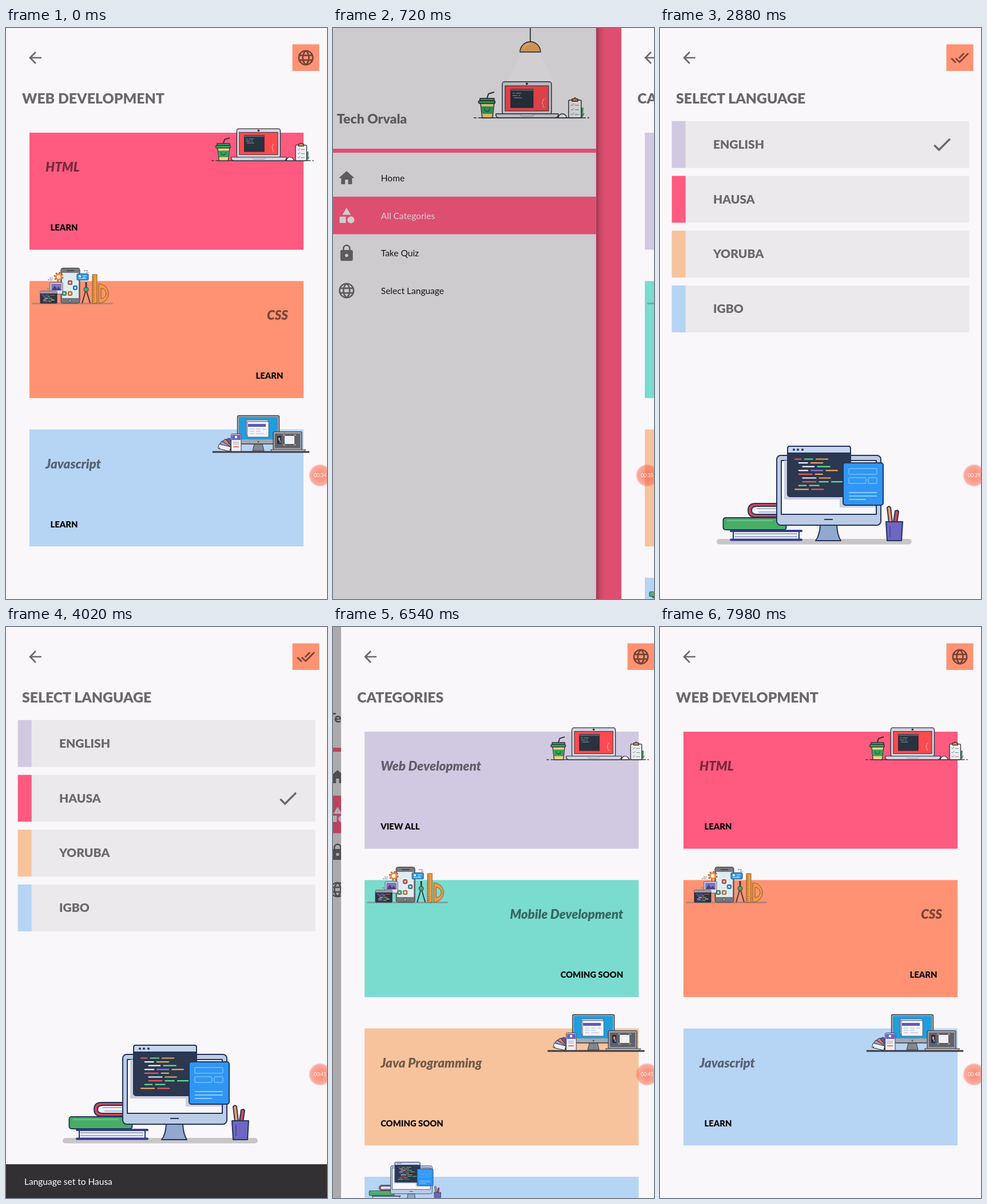
Animation, 561 px wide and 998 px high, one loop 8000 ms. Source, as an HTML page:

```html
<!DOCTYPE html>
<html lang="en">
<head>
<meta charset="utf-8">
<title>Learning app</title>
<style>
  html, body { margin: 0; width: 100%; height: 100%; overflow: hidden; background: #f9f7fa; }
  svg { display: block; width: 100%; height: 100%; }
  text { font-family: Lato, sans-serif; }
  .title { font-weight: 900; font-size: 24.8px; fill: #6b696c; }
  .card { font-weight: 900; font-style: italic; font-size: 22.3px; fill: rgba(0,0,0,.53); }
  .button { font-weight: 900; font-size: 14.8px; fill: #0d0b0d; }
  .language { font-weight: 900; font-size: 21px; fill: #6b696c; }
  .brand { font-weight: 900; font-size: 23px; fill: #6b696c; }
  .item { font-size: 15.5px; }
  .end { text-anchor: end; }
  .icon { fill: currentColor; }
  .ink { stroke: #2a2a32; stroke-width: 1.4; stroke-linejoin: round; stroke-linecap: round; }
  .navy { stroke: #24355c; stroke-width: 2; stroke-linejoin: round; stroke-linecap: round; }
</style>
</head>
<body>
<svg id="stage" viewBox="0 0 561 998"></svg>
<script>
const W = 561, H = 998, LOOP = 8000, STEP = 60, SLIDE = 300;
const PAGE = '#f9f7fa', PINK = '#ff5a80', ORANGE = '#fe9273', BLUE = '#b6d4f4',
      PURPLE = '#d1c9e1', TEAL = '#79dccf', PEACH = '#f7c39c', GREY = '#ebe9ec',
      TEXT = '#6b696c', FADED = 'rgba(0,0,0,.54)';

const rect = (x, y, w, h, fill, more = '') => `<rect x="${x}" y="${y}" width="${w}" height="${h}" fill="${fill}" ${more}/>`;
const circle = (x, y, r, fill, more = '') => `<circle cx="${x}" cy="${y}" r="${r}" fill="${fill}" ${more}/>`;
const path = (d, fill = 'none', more = '') => `<path d="${d}" fill="${fill}" ${more}/>`;
const line = (d, color, width = 1, more = '') => path(d, 'none', `stroke="${color}" stroke-width="${width}" ${more}`);
const text = (x, y, cls, label, more = '') => `<text x="${x}" y="${y}" class="${cls}" ${more}>${label}</text>`;
const group = (id, body, more = '') => `<g id="${id}" ${more}>${body}</g>`;
const use = (id, transform = '') => `<use href="#${id}" transform="${transform}"/>`;
const ink = 'class="ink"', navy = 'class="navy"';

// Rows of short coloured dashes that look like source code
function codeLines(x, y, rows, gap, unit, width, seed = 1) {
  const colors = ['#8a78ee', '#5fe08c', '#f3a35c', '#f4f4f8', '#ee5660'];
  const random = () => (seed = seed * 16807 % 2147483647) / 2147483647;
  let out = '';
  for (let i = 0; i < rows; i++) {
    let left = x + [0, 1, 2, 1, 1, 2, 2, 1, 0][i % 9] * unit * .45;
    for (let j = 0; j < 2 + (i % 3 === 0); j++) {
      const len = unit * (.7 + random() * .9);
      out += line(`M${left} ${y + i * gap}h${len}`, colors[Math.floor(random() * 5)], width, 'stroke-linecap="round"');
      left += len + unit * .4;
    }
  }
  return out;
}

// Icons on a 24 unit grid
const glyph = d => `<path d="${d}"/>`;
const icons = {
  back: glyph('M20 11H7.83l5.59-5.59L12 4l-8 8 8 8 1.41-1.41L7.83 13H20z'),
  globe: line('M3 12a9 9 0 0 1 18 0a9 9 0 0 1-18 0zM8 12c0-4 1.5-7 4-9c2.500 2 4 5 4 9s-1.500 7-4 9c-2.500-2-4-5-4-9zM3.600 9h16.800M3.600 15h16.800', 'currentColor', 2),
  home: glyph('M10 20v-6h4v6h5v-8h3L12 3 2 12h3v8z'),
  shapes: glyph('M12 2l-5.5 9h11zM3 13.5h8v8H3zM13 17.5a4.5 4.5 0 0 0 9 0a4.5 4.5 0 0 0-9 0z'),
  lock: glyph('M18 8h-1V6A5 5 0 0 0 7 6v2H6a2 2 0 0 0-2 2v10a2 2 0 0 0 2 2h12a2 2 0 0 0 2-2V10a2 2 0 0 0-2-2zm-6 9a2 2 0 1 1 0-4a2 2 0 0 1 0 4zm3.1-9H8.9V6a3.1 3.1 0 0 1 6.2 0z'),
  check: glyph('M9 16.17L4.83 12l-1.42 1.41L9 19 21 7l-1.41-1.41z'),
  done: glyph('M18 7l-1.41-1.41-6.34 6.34 1.41 1.41zM22.24 5.59L11.66 16.17 7.48 12l-1.41 1.41L11.66 19l12-12zM.41 13.41L6 19l1.41-1.41L1.83 12z')
};
const icon = (name, x, y, color, scale = 1.36) =>
  `<g class="icon" color="${color}" transform="translate(${x - 12 * scale} ${y - 12 * scale}) scale(${scale})">${icons[name]}</g>`;

const laptopArt =
  line('M260 157h5M268 157h188M459 157h3', '#2a2a32', 1.5) +
  path('M272 131h24l-3 26h-18z', '#f5d27a', ink) +
  path('M273 137h22l-1.5 13h-19z', '#38a05f') +
  line('M279 143q4 6 9 0', '#174c30', 1.2) + circle(279, 141, .9, '#174c30') + circle(288, 141, .9, '#174c30') +
  line('M283 124l3-9 10-3', '#2a2a32', 2) +
  rect(271, 123, 25, 5, '#38a05f', ink) + rect(268.5, 127, 29, 5, '#38a05f', 'rx="2" ' + ink) +
  rect(310, 94, 86, 57, '#d4d6e2', 'rx="4" ' + ink) +
  rect(315, 101, 76, 44, '#fb4b50', 'stroke="#2a2a32"') + circle(353, 97.5, 2, '#2a2a32') +
  rect(325, 107, 39, 32, '#29323f', 'stroke="#20232b"') + rect(325, 107, 39, 3, '#59606d') +
  line('M328 114h4M334 114h9M328 118h8M338 118h3M330 122h14', '#9bb8b8') +
  line('M384 124q-3 0-3 3t-2 4q2 0 2 4t3 4', '#ff9b98', 1.3) +
  path('M299 150h109v2q-1 5-6 5h-97q-6 0-6-5z', '#d4d6e2', ink) + line('M341 151q1 3 4 3h17q3 0 4-3', '#8d909d') +
  path('M408 157q1-7 7-7t8 7z', '#f1f1f4', ink) +
  line('M450 139l-1 15', '#38a05f', 4) + line('M453 149l-4 8', '#2a2a32') +
  rect(426, 126, 22, 31, '#eceef1', 'rx="2" ' + ink) + path('M432 128v-4h3q2-4 4 0h3v4z', '#ef8d48', ink) +
  line('M430 134l2 2 3-4M430 142l2 2 3-4M430 150l2 2 3-4', '#65856f') + line('M437 135h7M437 143h7M437 151h7', '#777');

const lampArt = path('M343 44h32l25 49h-82z', '#fff', 'opacity=".24"') + line('M359 0v25', '#2a2a32', 1.7) +
  path('M341 42a18 18 0 0 1 36 0z', '#eda75f', ink) + line('M347 37q3-8 11-9', '#f7cc94', 1.5);

const tile = (x, y, color) => rect(x - 3.5, y - 3.5, 7, 7, color, 'rx="1.5" stroke="#444" stroke-width=".8"') + rect(x - 1.3, y - 1.3, 2.6, 2.6, '#fff');
const phoneArt =
  rect(45, 480, 142, 3, '#857a78', 'rx="1.5" opacity=".55"') +
  rect(96, 419.5, 33, 61.5, '#77777c', 'rx="3.5" stroke="#3b3b43"') + rect(98, 428, 29, 44, '#dfecef') +
  line('M106 424h13', '#3b3b43', 1.5) + circle(112, 476.5, 2.3, '#aaaab0', 'stroke="#3b3b43" stroke-width=".8"') +
  circle(92, 435, 7, 'none', 'stroke="#b5602d" stroke-width="2.8" stroke-dasharray="2.75"') +
  circle(92, 435, 4.8, 'none', 'stroke="#f28a3c" stroke-width="3"') +
  rect(124, 429.5, 20, 11, '#2d97e4', 'rx="1.5" stroke="#285675"') + circle(129, 434, 2, '#fff') + line('M134 433h7M134 436h5M127 438h13', '#d8efff') +
  line('M76 437h6M73 440h9M136 424h7M140 427h5M72 456h4', '#6b5560', 1, 'stroke-dasharray="3 1"') +
  rect(77, 445, 22, 20, '#e6e4f5', 'rx="1" stroke="#55506b"') + rect(79, 447, 18, 12, '#8177bd') +
  path('M80 458l5-8 4 6 3-4 4 6z', '#493e83') + line('M80 462h9', '#55506b') +
  rect(60, 460, 29, 21, '#30333e', 'rx="1" stroke="#25262c"') + rect(60, 460, 29, 4, '#969ba6') +
  codeLines(63, 467, 5, 2.8, 5, 1, 9) +
  tile(112, 445, '#e94d50') + tile(121, 454, '#3291dc') + tile(102, 464, '#38a760') + tile(112, 464, '#f28a3c') +
  line('M140 457l-7 24M140 457l7 24', '#3b3b43', 2) + line('M140 444v12', '#3b3b43', 3) + circle(140, 457, 4, '#48a769', 'stroke="#3b3b43"') +
  rect(151, 431, 8, 50, '#ee9b45', 'stroke="#8c5426"') + line('M153 435v43', '#8c5426', 3, 'stroke-dasharray="1 2.5"') +
  path('M162 447a17 17 0 0 1 0 34zM166 455v18a9 9 0 0 0 0-18z', '#ee9b45', 'fill-rule="evenodd" stroke="#8c5426"');

const swatch = (angle, color) => `<g transform="rotate(${angle} 391 739)">${rect(370, 732, 21, 8, color, 'rx="1.5" stroke="#34343d"')}</g>`;
const desktopArt =
  path('M434 727h14l3 12h-20z', '#85878e', 'stroke="#3a3b43"') +
  rect(404.5, 677.5, 73, 49.5, '#a6a8ae', 'rx="2.5" stroke="#3a3b43" stroke-width="1.3"') + rect(407, 680, 68, 39, '#209ddd') +
  circle(441, 723, 1.5, '#55565d') +
  rect(420, 685, 38, 27, '#d9dcea', 'stroke="#4b526b" stroke-width=".8"') + rect(422, 688, 37, 27, '#f5f5fb', 'stroke="#4b526b" stroke-width=".8"') +
  rect(423, 692, 31, 5, '#5d58bd') + line('M426 701h8M437 701h8M448 701h6M426 705h8M437 705h8M426 709h8M437 709h14', '#aeb5cc') +
  line('M421 687.5h36', '#60667c', 1, 'stroke-dasharray="1.2 1.5"') +
  rect(467, 705.5, 50, 33, '#9c9da3', 'rx="2" stroke="#3a3b43" stroke-width="1.2"') + rect(470, 709, 44, 25, '#616268') +
  rect(474, 713, 7, 14, '#272b48') + rect(476, 716, 3, 5, '#ef995a') + rect(478, 721, 2, 4, '#65a8e0') +
  rect(487, 713, 17, 14, '#f0f0f2') + line('M485 713v-2h3M503 711h3v2M506 727v2h-3M488 729h-3v-2', '#ddd', .8) +
  path('M462 737h62l-4 4h-54z', '#c5c6cc', 'stroke="#3a3b43"') +
  swatch(72, '#5a58b8') + swatch(52, '#ef7e5b') + swatch(33, '#8ba5e5') + swatch(14, '#f1f1f5') + circle(373, 734, 1, '#444') +
  rect(393.5, 709.5, 17.5, 31, '#eeeef7', 'rx="2" stroke="#3c3d4e"') + rect(394.5, 711, 15.5, 9, '#6964c5') +
  circle(402, 715, 2.2, '#fff') + line('M397 724h10M397 727h10', '#9ca0b5') + line('M397 732h10', '#ef7e5b', 2.2) +
  line('M362 741h167', '#3c3c42', 3, 'stroke-linecap="round"');

const booksArt =
  rect(99, 893, 341, 9.5, '#c9c6c7', 'rx="4.7"') +
  path('M215 831h-48q-13 0-13 12t13 12h48z', '#d64757', navy) + path('M215 836h-46q-9 0-9 7t9 7h46z', '#f6f5fa', navy) +
  line('M169 840h36M172 846h33', '#8e9ac0', 1.3) +
  rect(128, 879, 115, 15, '#eef0f8', navy) + line('M130 884h110M130 889h110', '#8792b7', 1.4) +
  line('M124 879h123M124 894.5h123', '#313b97', 4, 'stroke-linecap="round"') +
  rect(110.5, 856, 110, 21, '#48ad67', 'rx="4" ' + navy) + line('M117 861h80', '#78cb91', 1.5) +
  path('M280 869h29q1 18 7 27h-44q7-9 8-27z', '#91a9ce', navy) +
  rect(204, 747, 182, 122, '#bccce6', 'rx="7" ' + navy) + rect(212, 756, 166, 94, '#f8f8fc', navy) +
  line('M287 859h15', '#24355c', 2) +
  rect(217, 756, 108, 68, '#c9cedd') + rect(314, 762, 63, 76, '#c9cedd') +
  rect(223, 731, 110, 88, '#2b3850', 'rx="4" ' + navy) + path('M223 743v-8q0-4 4-4h102q4 0 4 4v8z', '#c7d6ed', navy) +
  [234, 241, 249].map(x => circle(x, 737, 2, '#24355c')).join('') + codeLines(236, 753.5, 9, 6.6, 15, 2.2, 7) +
  rect(320, 760, 70, 74, '#2f96f5', 'rx="4" ' + navy) +
  `<g stroke="#77c1ff" stroke-width="1.3">${rect(330, 770, 49, 10, 'none', 'rx="2"')}${rect(330, 786, 30, 10, 'none', 'rx="2"')}${rect(364, 786, 15, 10, 'none', 'rx="2"')}</g>` +
  line('M330 812h49M330 818h49M330 824h30', '#a9dcff', 1.6) +
  path('M400 864l-3-26 3-2 3 2 3 26z', '#f2a060', navy) + path('M408 864l3-20 4-1 2 2-3 20z', '#d64757', navy) +
  path('M395 863h29l-2 33h-25z', '#6f66c2', navy) + line('M402 870v20', '#5149a2', 2);

const arts = { laptop: laptopArt, phone: phoneArt, desktop: desktopArt, books: booksArt };
const cardArt = [use('laptop', 'translate(129 93) scale(.885)'), use('phone'), use('desktop'), use('books', 'translate(4.8 643) scale(.4)')];

const header = (title, iconName) => rect(0, 0, W, H, PAGE) + icon('back', 51, 52, TEXT) +
  rect(500.5, 28.5, 47, 46.5, ORANGE) + icon(iconName, 524, 52, FADED) + text(28, 132, 'title', title);

function cardList(cards, buttonInset) {
  return cards.map(([label, button, color], i) => {
    const y = 183 + i * 259.3, right = i % 2;
    return rect(41, y, 479, 204.5, color) +
      text(right ? 493 : 69, y + 68, right ? 'card end' : 'card', label) +
      text(right ? 493 - buttonInset : 69 + buttonInset, y + 171, right ? 'button end' : 'button', button) + cardArt[i];
  }).join('');
}

const categories = header('CATEGORIES', 'globe') + cardList([
  ['Web Development', 'VIEW ALL', PURPLE], ['Mobile Development', 'COMING SOON', TEAL],
  ['Java Programming', 'COMING SOON', PEACH], ['', '', BLUE]], 0);

const webPage = header('WEB DEVELOPMENT', 'globe') + cardList([
  ['HTML', 'LEARN', PINK], ['CSS', 'LEARN', ORANGE], ['Javascript', 'LEARN', BLUE]], 8.5);

const languages = header('SELECT LANGUAGE', 'done') +
  [['ENGLISH', PURPLE], ['HAUSA', PINK], ['YORUBA', PEACH], ['IGBO', BLUE]].map(([label, color], i) => {
    const y = 162.7 + i * 95.8;
    return rect(20.7, y, 519.8, 81.8, GREY) + rect(20.7, y, 24, 81.8, color) + text(93, y + 48, 'language', label);
  }).join('') +
  group('check', icon('check', 492.7, 299.5, TEXT, 1.7)) + use('books') +
  group('snackbar', rect(0, 939, W, 59, '#323032') + text(32, 974.5, 'item', 'Language set to Hausa', 'fill="#fff"'));

const menu = [['Home', 'home'], ['All Categories', 'shapes'], ['Take Quiz', 'lock'], ['Select Language', 'globe']];
const menuRow = (i, active) => {
  const y = 262.2 + i * 65.6, [label, name] = menu[i];
  return (active ? rect(0, y - 33, 474, 65.6, PINK) : '') + icon(name, 38, y, active ? '#efedf0' : TEXT) +
    text(98, y + 6, 'item', label, `fill="${active ? '#f6eef2' : '#171719'}"`);
};
const drawer = rect(0, 0, W + 60, H, PINK) + rect(474, 0, 16, H, 'url(#shade)') + rect(0, 0, 474, H, GREY) +
  lampArt + use('laptop') + text(21, 167, 'brand', 'Tech Orvala') + rect(0, 211, 474, 7, PINK) +
  menu.map((_, i) => group('row' + i, menuRow(i, false)) + group('active' + i, menuRow(i, true))).join('');

const dim = id => rect(0, 0, W + 60, H, '#000', `id="${id}"`);
const stop = (offset, color, opacity) => `<stop offset="${offset}" stop-color="${color}" stop-opacity="${opacity}"/>`;
document.getElementById('stage').innerHTML =
  `<defs><linearGradient id="shade">${stop(0, '#000', .3)}${stop(.4, '#000', .1)}${stop(1, '#000', 0)}</linearGradient>
   <radialGradient id="bubble">${stop(.3, '#fa6448', .68)}${stop(.85, '#fa6448', .52)}${stop(1, '#fa6448', .2)}</radialGradient>
   ${Object.entries(arts).map(([id, art]) => group(id, art)).join('')}</defs>` +
  group('drawer', drawer + dim('drawerDim')) +
  group('categories', categories + dim('categoriesDim')) +
  group('languages', languages) + group('web', webPage) +
  circle(549, 782, 19.5, 'url(#bubble)') + text(549, 785, '', '', 'id="clock" text-anchor="middle" font-size="8.5" fill="#fff"');

const el = id => document.getElementById(id);
const move = (id, x, y = 0) => el(id).setAttribute('transform', `translate(${x} ${y})`);
const show = (id, on) => el(id).setAttribute('visibility', on ? 'visible' : 'hidden');
const easeOut = (t, start, length = SLIDE) => 1 - (1 - Math.min(1, Math.max(0, (t - start) / length))) ** 3;

function placePage(id, cover) {
  show(id, cover > 0);
  move(id, W * (1 - cover));
}
// The layer below drifts left and darkens while a page covers it
function recede(id, cover, x = 0) {
  const depth = 1 - (1 - cover) ** 6;
  move(id, x - 30 * depth);
  el(id + 'Dim').setAttribute('opacity', .27 * depth);
}

function draw(t) {
  const web = Math.max(1 - easeOut(t, 120), easeOut(t, 7240));
  const category = Math.max(1 - easeOut(t, 560), easeOut(t, 6328));
  const language = Math.min(easeOut(t, 2460), 1 - easeOut(t, 4943));
  placePage('web', web);
  placePage('languages', language);
  placePage('categories', category);
  recede('categories', web, W * (1 - category));
  recede('drawer', Math.max(category, language));

  const active = t >= 2000 && t < 6000 ? 3 : 1;
  menu.forEach((_, i) => {
    show('row' + i, i !== active);
    show('active' + i, i === active);
  });
  move('check', 0, t < 3600 ? -96 : 0);
  move('snackbar', 0, 59 * (1 - Math.min(easeOut(t, 3640, 160), 1 - easeOut(t, 4700, 160))));
  el('clock').textContent = '00:' + (34 + Math.floor(t / 570));
}

function tick() {
  const t = performance.now() % LOOP;
  draw(t - t % STEP);
  requestAnimationFrame(tick);
}
tick();
</script>
</body>
</html>
```
